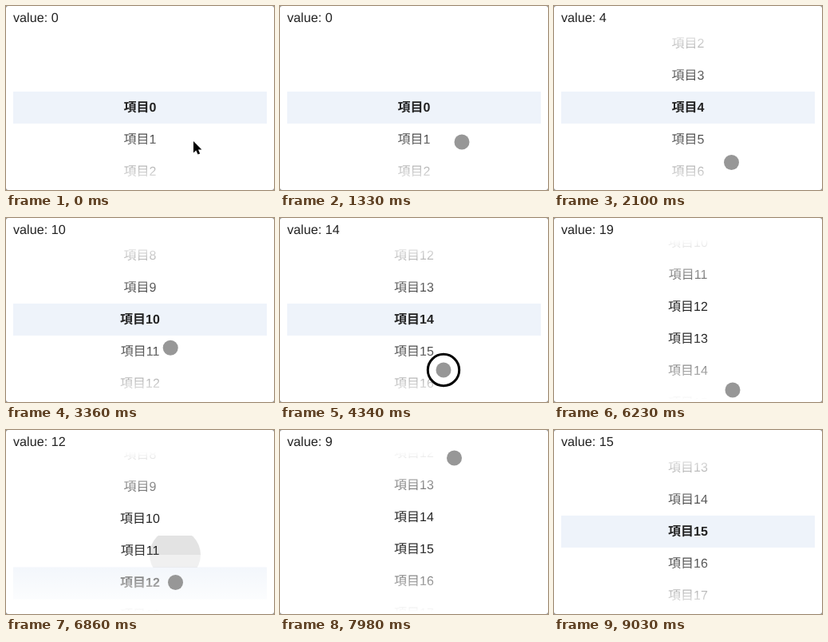
These frames come from a looping animation (336x230 px, 9.52 s). An HTML page:

```html
<!DOCTYPE html>
<html lang="ja">
<head>
<meta charset="utf-8">
<title>Picker</title>
<style>
  html, body { margin: 0; width: 100%; height: 100%; overflow: hidden; background: #8a8a8a; }
  svg { display: block; width: 336px; height: 230px; }
  text {
    font: 16px "Liberation Sans", "Noto Sans CJK JP", "Noto Sans CJK", sans-serif;
    fill: #222;
    text-rendering: geometricPrecision;
  }
  #value { font-size: 16.2px; }
  .item { text-anchor: middle; }
  .selected { font-weight: bold; }
</style>
</head>
<body>
<svg viewBox="0 0 336 230">
  <defs>
    <linearGradient id="fadeTop" x2="0" y2="1">
      <stop stop-color="#fff"/><stop offset="1" stop-color="#fff" stop-opacity="0"/>
    </linearGradient>
    <linearGradient id="fadeBottom" x2="0" y2="1">
      <stop stop-color="#fff" stop-opacity="0"/><stop offset="1" stop-color="#fff"/>
    </linearGradient>
    <linearGradient id="bands" x2="0" y2="1">
      <stop offset=".125" stop-opacity="0"/><stop offset=".125" stop-opacity=".11"/>
      <stop offset=".5" stop-opacity=".11"/><stop offset=".5" stop-opacity=".06"/>
      <stop offset=".75" stop-opacity=".06"/><stop offset=".75" stop-opacity="0"/>
    </linearGradient>
    <clipPath id="viewport"><rect x="9" y="27" width="318" height="200"/></clipPath>
  </defs>
  <rect width="336" height="230" rx="3" fill="#fff"/>
  <text id="value" x="9" y="20"></text>
  <g clip-path="url(#viewport)">
    <g id="list"><rect id="highlight" x="9" width="318" height="40" fill="#eef3fa"/></g>
    <rect x="9" y="27" width="318" height="80" fill="url(#fadeTop)"/>
    <rect x="9" y="147" width="318" height="80" fill="url(#fadeBottom)"/>
  </g>
  <circle id="ripple" cx="212" cy="156" r="32" fill="url(#bands)"/>
  <g id="pointer">
    <path id="arrow" d="M0 0V14.5L3.3 11.4 5.6 16.6 8.2 15.5 6 10.4H10.4Z"
          stroke="#fff" stroke-width="2" paint-order="stroke"/>
    <circle id="dot" r="9.5" fill="#979797"/>
    <circle id="ring" r="19.7" fill="none" stroke="#000" stroke-width="3"/>
  </g>
</svg>
<script>
const LOOP = 9520, TICK = 70, ROW = 40, COUNT = 20;
const HOLD = 2 * TICK;      // how long the press ring stays
const APPROACH = 7 * TICK;  // lead time of the move towards a press
const REACH = 164;          // longest finger stroke in px

const flicks = [
  { press: 1400, x: 228,   y: 170,   row: 4,  rest: 1960 },
  { press: 2240, x: 222.5, y: 195.5, row: 10, rest: 2940 },
  { press: 3570, x: 205,   y: 195,   row: 14, rest: 4130 },
  { press: 4340, x: 205,   y: 190,   row: 19, rest: 4830 },
  { press: 5670, x: 212.5, y: 85.5,  row: 12, rest: 6370 },
  { press: 6650, x: 208,   y: 126,   row: 9,  rest: 7140 },
  { press: 7560, x: 230,   y: 199,   row: 15, rest: 8120 }
];

const $ = id => document.getElementById(id);
const clamp = (v, low, high) => Math.min(high, Math.max(low, v));
const progress = (t, from, to) => clamp((t - from) / (to - from), 0, 1);
const mix = (a, b, p) => a + (b - a) * p;
const easeOut = p => 1 - (1 - p) ** 1.9;
const within = (t, start, length) => t >= start && t < start + length;
const show = (id, on) => $(id).setAttribute("visibility", on ? "visible" : "hidden");

// The value changes after the list rests, once the finger sets off again.
flicks.forEach((flick, i) => {
  const next = flicks[i + 1];
  flick.shown = Math.max(flick.rest + HOLD, next ? next.press - APPROACH : 0);
});

function stateAt(t) {
  let x = 235, y = 169, row = 0, value = 0, lastRest = 0;
  const moveTo = (toX, toY, from, to) => {
    const p = progress(t, from, to);
    x = mix(x, toX, p);
    y = mix(y, toY, p);
  };

  moveTo(255, 155, 0, 210);
  for (const flick of flicks) {
    moveTo(flick.x, flick.y, Math.max(lastRest, flick.press - APPROACH), flick.press - HOLD);
    const scrolled = (flick.row - row) * easeOut(progress(t, flick.press + TICK, flick.rest));
    const stroke = clamp(scrolled * ROW, -REACH, REACH);
    x -= stroke * 0.07;
    y = clamp(y - stroke, 10, 215);
    row += scrolled;
    if (t >= flick.shown) value = flick.row;
    if (t < flick.rest) break;
    lastRest = flick.rest;
  }
  // Later approaches start only after the loop has passed them.
  moveTo(168, 242, 8540, 9030);
  return { x, y, row, value };
}

const items = Array.from({ length: COUNT }, (_, i) => {
  const item = document.createElementNS("http://www.w3.org/2000/svg", "text");
  item.setAttribute("x", 168);
  item.setAttribute("y", 132 + i * ROW);
  item.textContent = "項目" + i;
  $("list").append(item);
  return item;
});

function draw(t) {
  const { x, y, row, value } = stateAt(t);
  $("value").textContent = "value: " + value;
  $("highlight").setAttribute("y", 107 + value * ROW);
  items.forEach((item, i) => item.setAttribute("class", i === value ? "item selected" : "item"));
  $("list").setAttribute("transform", `translate(0 ${-row * ROW})`);
  $("pointer").setAttribute("transform", `translate(${x} ${y})`);
  show("arrow", t < 1120);
  show("dot", within(t, 1120, 7910));
  show("ring", within(t, 490, TICK) || flicks.some(flick => within(t, flick.press, HOLD)));
  show("ripple", within(t, 6860, TICK));
}

const start = performance.now();
function frame() {
  const elapsed = (performance.now() - start) % LOOP;
  draw(Math.floor(elapsed / TICK) * TICK);
  requestAnimationFrame(frame);
}
frame();
</script>
</body>
</html>
```
